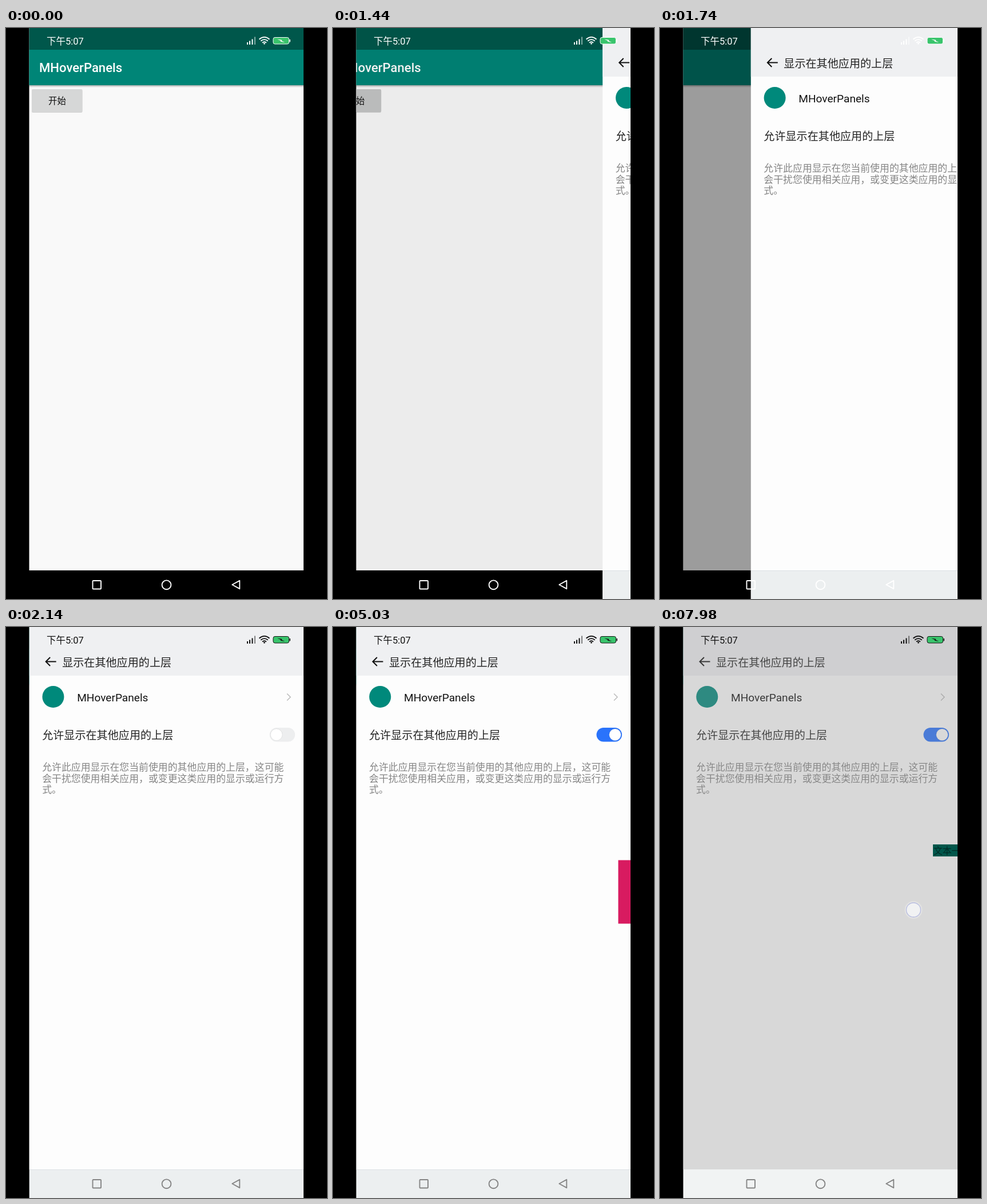
An HTML page that plays this animation: 561 px wide and 998 px high, repeating every 8000 ms.

```html
<!DOCTYPE html>
<html lang="zh-CN">
<head>
<meta charset="utf-8">
<style>
html, body { margin: 0; width: 100%; height: 100%; overflow: hidden; background: #000; }
svg { display: block; width: 561px; height: 998px; }
text { font-family: Roboto, "Noto Sans CJK SC", "Noto Sans CJK", sans-serif; white-space: pre; }
.line { fill: none; stroke: currentColor; stroke-width: 1.9; stroke-linejoin: round; }
</style>
</head>
<body>
<svg viewBox="0 0 561 998">
  <defs>
    <clipPath id="screen"><path d="M40.5 0H520V998H40.5z"/></clipPath>
    <linearGradient id="shade" x2="0" y2="1">
      <stop stop-color="#000" stop-opacity=".3"/><stop offset="1" stop-color="#000" stop-opacity="0"/>
    </linearGradient>
  </defs>
  <rect width="561" height="998"/>
  <g clip-path="url(#screen)">
    <g id="home">
      <rect x="40" width="481" height="948" fill="#f9f9f9"/>
      <rect x="40" width="481" height="38" fill="#00574b"/>
      <rect x="40" y="38" width="481" height="62" fill="#008577"/>
      <rect x="40" y="100" width="481" height="4" fill="url(#shade)"/>
      <g id="content">
        <text x="58" y="77" font-size="22.1" font-weight="500" fill="#fff">MHoverPanels</text>
        <rect x="45" y="108" width="88.5" height="40" rx="2" opacity=".15"/>
        <rect id="button" x="45" y="107" width="88.5" height="40" rx="2" fill="#d6d7d7"/>
        <text x="74" y="132.5" font-size="15.4" fill="#111">开始</text>
      </g>
      <rect id="shadow" x="40" width="481" height="948"/>
    </g>

    <g id="page">
      <rect x="40.5" width="480" height="998" fill="#fdfdfd"/>
      <rect x="40.5" width="480" height="85" fill="#eff0f2"/>
      <path d="M87.500 60.500H70M77 53L69.500 60.500L77 68" fill="none" stroke="#111" stroke-width="2"/>
      <text x="98" y="68.500" font-size="19.1" fill="#222">显示在其他应用的上层</text>
      <circle cx="82.300" cy="122" r="19" fill="#00897b"/>
      <text x="124" y="130" font-size="19.1" fill="#111">MHoverPanels</text>
      <path d="M491 116.500L497 122.500L491 128.500" fill="none" stroke="#bbb" stroke-width="1.500"/>
      <text x="63" y="195.500" font-size="19.1" fill="#222">允许显示在其他应用的上层</text>
      <rect id="track" x="460.500" y="176" width="44.500" height="24.500" rx="12.250"/>
      <circle id="knob" cy="188.200" r="10.300" fill="#fff" stroke="#000" stroke-opacity=".08"/>
      <g font-size="16.9" fill="#858585">
        <text x="63" y="251">允许此应用显示在您当前使用的其他应用的上层，这可能</text>
        <text x="63" y="270.500">会干扰您使用相关应用，或变更这类应用的显示或运行方</text>
        <text x="63" y="290">式。</text>
      </g>
      <rect id="dim" x="40" width="481" height="948" fill="#8c8c8c"/>
      <rect id="navBar" x="40.500" y="948" width="480" height="50"/>
      <path id="navLine" d="M40.500 948.500H520.500" stroke="#dde1e4"/>
    </g>

    <rect id="floater" x="498.500" y="407.500" width="23" height="111" fill="#d81b60"/>
    <g id="strip">
      <rect y="380" width="60" height="21" fill="#00574b"/>
      <text x="1" y="396.500" font-size="15.8" fill="#002c26">文本一</text>
    </g>

    <g id="status" fill="currentColor">
      <text x="71" y="29" font-size="16.5">下午5:07</text>
      <path d="M421 25h2v4h-2zM425 22.500h2v6.500h-2zM429.500 19.500h2v9.500h-2z"/>
      <path d="M434 15.500h2v13.500h-2z" opacity=".5"/>
      <g class="line" style="stroke-width:1.8">
        <path d="M442.500 19.800Q451.500 12 460.500 19.800M445.300 22.800Q451.500 17.500 457.700 22.800M448 25.700Q451.500 22.700 455 25.700"/>
      </g>
      <circle cx="451.500" cy="27.300" r="1.400"/>
      <rect x="467" y="16.500" width="27.500" height="11.500" rx="3" fill="#39c46c" stroke="currentColor"/>
      <path d="M495.500 20h1.500v4.500h-1.500zM474 19.500L482.500 21L481.500 22.300L487.500 25.300L479.500 23.800L480.500 22.500z"/>
    </g>
    <g id="nav" class="line">
      <rect x="151.500" y="966" width="14.500" height="14.500" rx="1"/>
      <circle cx="280.500" cy="973.300" r="7.900"/>
      <path d="M395.300 973L408.300 965.800V980.200z"/>
    </g>
    <g id="touch">
      <circle r="15.500" fill="#fff" opacity=".25"/>
      <circle r="12.500" fill="#f1f2f3" stroke="#b7bce0" stroke-width="1.300"/>
    </g>
  </g>
</svg>
<script>
const LOOP = 8000;
const el = id => document.getElementById(id);
const set = (id, name, value) => el(id).setAttribute(name, value);
const show = (id, on) => set(id, 'visibility', on ? 'visible' : 'hidden');
const ramp = (t, a, b) => Math.min(1, Math.max(0, (t - a) / (b - a)));
const smooth = x => x * x * (3 - 2 * x);
const mix = (a, b, k) => a + (b - a) * k;
const blend = (a, b, k) => `rgb(${a.map((v, i) => Math.round(mix(v, b[i], k)))})`;

// Cubic Bezier (.4, 0, .3, 1), solved by bisection
function glide(x) {
  let lo = 0, hi = 1;
  for (let i = 0; i < 24; i++) {
    const s = (lo + hi) / 2, r = 1 - s;
    if (1.2 * s * r * r + .9 * s * s * r + s * s * s < x) lo = s; else hi = s;
  }
  return smooth(lo);
}

function touchAt(t) {
  if (t >= 500 && t < 900) return [90, 128];
  if (t >= 2790 && t < 2960) return [483, 190];
  if (t < 5880) return null;
  const a = smooth(ramp(t, 6400, 7460)), b = ramp(t, 7500, 7980);
  return [491.5 - 39.5 * a - 9 * b, 479.500 + 14 * a + b];
}

function draw(t) {
  const slide = glide(ramp(t, 1273, 2160));
  const offset = 480 * slide;
  set('content', 'transform', `translate(${-offset})`);
  set('shadow', 'opacity', slide / 2);
  set('page', 'transform', `translate(${480 - offset})`);
  show('page', slide > 0);
  set('button', 'fill', blend([214, 215, 215], [196, 197, 197], ramp(t, 520, 1220)));

  const on = smooth(ramp(t, 2920, 3180));
  set('track', 'fill', blend([237, 238, 239], [42, 115, 251], on));
  set('knob', 'cx', mix(472.5, 493, on));
  show('floater', t >= 3260 && t < 6060);

  const dim = ramp(t, 5920, 6140);
  set('dim', 'opacity', .33 * dim);
  set('navBar', 'fill', blend([236, 239, 240], [241, 243, 243], dim));
  set('navLine', 'opacity', 1 - dim);

  el('status').style.color = t < 2140 ? '#fff' : '#111';
  el('nav').style.color = t < 2080 ? '#fff' : '#858585';

  const touch = touchAt(t);
  show('touch', touch);
  if (touch) set('touch', 'transform', `translate(${touch})`);
  // The menu strip follows the dragging finger
  show('strip', t >= 6400);
  if (touch) set('strip', 'transform', `translate(${Math.min(521, touch[0] + 34)})`);
}

function tick() {
  draw(performance.now() % LOOP);
  requestAnimationFrame(tick);
}
tick();
</script>
</body>
</html>
```
